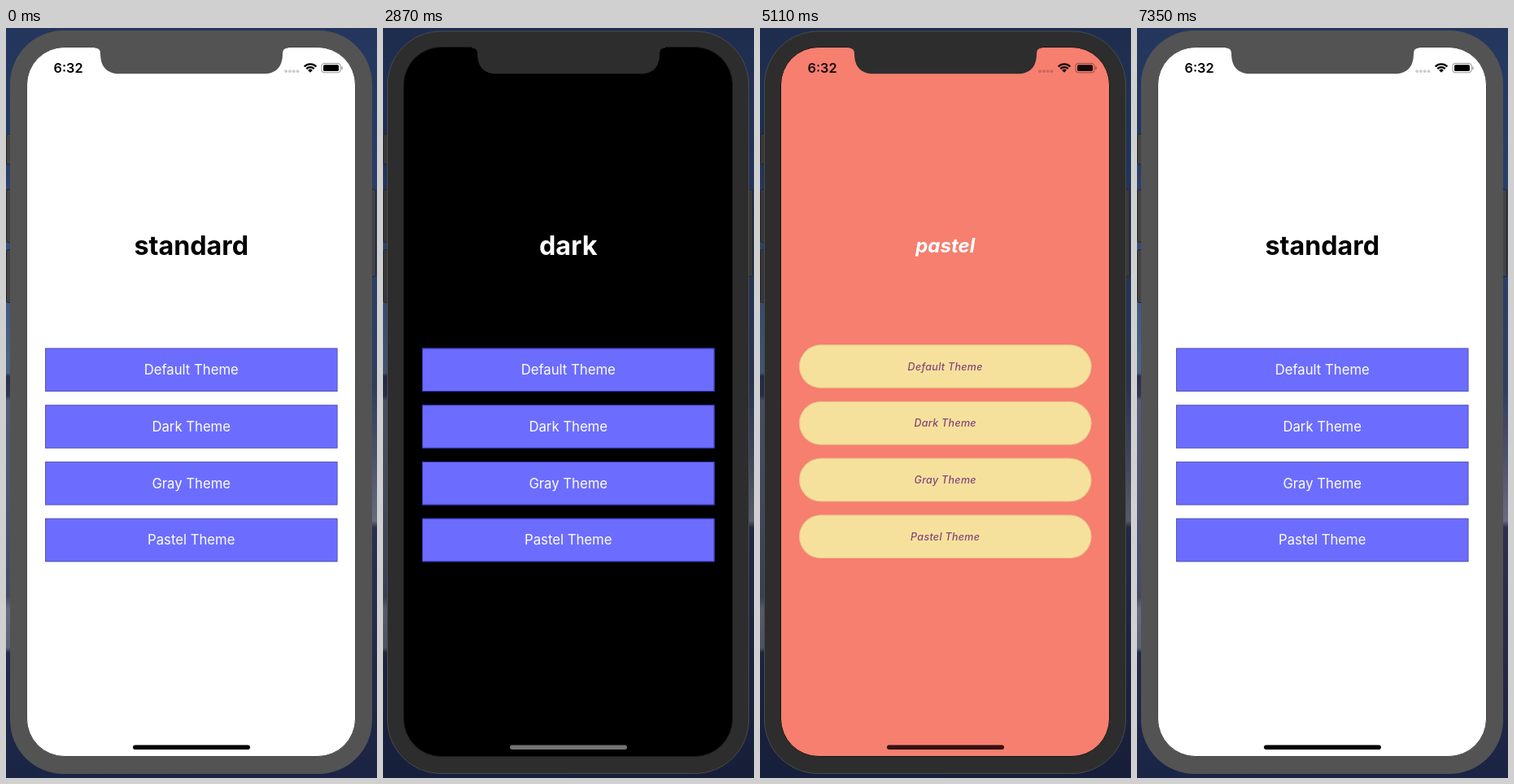
An HTML page with a canvas for the animation above (7.91 s loop, 456x922 px).

```html
<!DOCTYPE html>
<html lang="en">
<head>
<meta charset="utf-8">
<title>Theme switcher</title>
<style>
  html, body { margin: 0; width: 100%; height: 100%; overflow: hidden; background: #1d2747; }
  canvas { display: block; width: 456px; height: 922px; }
</style>
</head>
<body>
<canvas id="stage" width="456" height="922"></canvas>
<script>
const ctx = document.getElementById('stage').getContext('2d');
const LOOP = 7910, STEP = 70, CENTER = 227.7, PITCH = 69.75;
const FONT = 'Inter, Roboto, sans-serif';
const LABELS = ['Default Theme', 'Dark Theme', 'Gray Theme', 'Pastel Theme'];

const THEMES = {
  standard: {
    screen: '#ffffff', ink: '#000000', home: '#000000',
    title: { color: '#000000', font: `700 32.25px ${FONT}`, y: 278.5 },
    button: { top: 393.5, radius: 0, fill: '#6c6dff', edge: 'rgba(70,70,130,.55)' },
    label: { color: '#ffffff', font: `400 16.7px ${FONT}`, dy: 32.6 }
  },
  dark: {
    screen: '#000000', ink: null, home: '#737373',
    title: { color: '#ffffff', font: `700 32.25px ${FONT}`, y: 278.5 },
    button: { top: 393.5, radius: 0, fill: '#6c6dff', edge: 'rgba(30,30,140,.7)' },
    label: { color: '#ffffff', font: `400 16.7px ${FONT}`, dy: 32.6 }
  },
  gray: {
    screen: '#d3d3d3', ink: '#000000', home: '#000000',
    title: { color: '#333333', font: `300 18.5px ${FONT}`, y: 274 },
    button: { top: 386.3, radius: 7.5, fill: '#333333', edge: '#292929' },
    label: { color: '#dadada', font: `700 12.9px ${FONT}`, dy: 31.3, spacing: '.35px' }
  },
  pastel: {
    screen: '#f67f6f', ink: '#14090a', home: '#35110f',
    title: { color: '#ffffff', font: `italic 700 24px ${FONT}`, y: 276 },
    button: { top: 389.3, radius: 26.8, fill: '#f6e19c', edge: 'rgba(205,150,100,.35)' },
    label: { color: '#83467a', font: `italic 500 12.5px ${FONT}`, dy: 31.3, spacing: '.3px' }
  }
};

// Each tap dims a button, then switches the theme on release.
const TAPS = [
  { press: 1590, release: 1750, button: 1, theme: 'dark' },
  { press: 2990, release: 3150, button: 2, theme: 'gray' },
  { press: 4180, release: 4690, button: 3, theme: 'pastel' },
  { press: 6140, release: 6440, button: 0, theme: 'standard' }
];
const FOCUS = { start: 1330, end: 7280 };
const STATUS_COMPLETE = 3850;

function roundRect(x, y, w, h, r, fill, stroke) {
  ctx.beginPath();
  ctx.roundRect(x, y, w, h, r);
  if (fill) { ctx.fillStyle = fill; ctx.fill(); }
  if (stroke) { ctx.strokeStyle = stroke; ctx.lineWidth = 1; ctx.stroke(); }
}

function text(string, x, y, { font, color, spacing = '0px' }, align = 'center') {
  ctx.font = font;
  ctx.letterSpacing = spacing;
  ctx.textAlign = align;
  ctx.fillStyle = color;
  ctx.fillText(string, x, y);
}

function gradientStrip(x, w, stops) {
  const g = ctx.createLinearGradient(0, 0, 0, 922);
  for (const [y, color] of stops) g.addColorStop(y / 922, color);
  ctx.fillStyle = g;
  ctx.fillRect(x, 0, w, 922);
}

function drawBackdrop(focused) {
  gradientStrip(0, 228, [
    [0, '#24365c'], [130, '#233861'], [335, '#40597f'], [424, '#4b6486'], [428, '#293150'],
    [452, '#303752'], [458, '#555a75'], [560, '#50566f'], [700, '#454a64'],
    [714, '#686a80'], [762, '#5d6077'], [768, '#222b49'], [922, '#1a2546']
  ]);
  gradientStrip(228, 228, [
    [0, '#24365c'], [200, '#283f69'], [440, '#303d60'], [525, '#4c506b'],
    [606, '#686a7f'], [614, '#2b3050'], [750, '#252b49'], [922, '#1b2444']
  ]);
  if (focused) {
    ctx.fillStyle = 'rgba(0,0,0,.16)';
    ctx.fillRect(0, 0, 456, 922);
  }
}

function drawBody(focused) {
  for (const [x, y, h] of [[0.5, 130.5, 37], [0.5, 198.5, 65], [0.5, 272.5, 65], [446.5, 198.5, 107]]) {
    roundRect(x, y, 8, h, 2, focused ? '#38383a' : '#434345', '#252528');
  }
  if (focused) roundRect(5.5, 4, 444, 912.5, 66, '#2d2d2d', '#4b4b4d');
  else roundRect(5, 3, 445, 914, 66, '#535353');
}

function drawScreen(color, focused) {
  roundRect(25.5, 23.5, 404, 872, 46.5, color, focused ? '#171717' : '#484848');
  ctx.beginPath();
  ctx.moveTo(109, 23);
  ctx.lineTo(109, 24.4);
  ctx.quadraticCurveTo(116, 24.4, 116, 31);
  ctx.bezierCurveTo(116, 48, 124, 56.3, 140, 56.3);
  ctx.lineTo(316, 56.3);
  ctx.bezierCurveTo(332, 56.3, 340, 48, 340, 31);
  ctx.quadraticCurveTo(340, 24.4, 347, 24.4);
  ctx.lineTo(347, 23);
  ctx.closePath();
  ctx.fillStyle = focused ? '#2d2d2d' : '#535353';
  ctx.fill();
}

function drawWifi(ink) {
  const cx = 374, cy = 54.8, from = -Math.PI * 0.75, to = -Math.PI * 0.25;
  ctx.strokeStyle = ctx.fillStyle = ink;
  ctx.lineWidth = 2.3;
  for (const r of [10.4, 6.7]) {
    ctx.beginPath();
    ctx.arc(cx, cy, r, from, to);
    ctx.stroke();
  }
  ctx.beginPath();
  ctx.moveTo(cx, cy);
  ctx.arc(cx, cy, 4, from, to);
  ctx.fill();
}

function drawStatus(ink, complete) {
  text('6:32', 58.5, 55, { font: `600 16.3px ${FONT}`, color: ink }, 'left');
  drawWifi(ink);
  roundRect(390, 45.2, 19, 7.8, 1.6, ink);
  if (!complete) return;
  ctx.globalAlpha = 0.2;
  for (let i = 0; i < 4; i++) roundRect(342.2 + i * 4.8, 51.3, 3.8, 3.8, 1.9, ink);
  ctx.globalAlpha = 0.42;
  roundRect(388, 43.5, 23, 11.3, 3, null, ink);
  roundRect(412.2, 47.2, 1.4, 4, 0.7, ink);
  ctx.globalAlpha = 1;
}

function drawButton(theme, index, opacity) {
  const { top, radius, fill, edge } = theme.button;
  const y = top + index * PITCH;
  ctx.globalAlpha = opacity;
  roundRect(48, y, 359.5, 53.5, radius, fill);
  roundRect(48.5, y + 0.5, 358.5, 52.5, Math.max(0, radius - 0.5), null, edge);
  text(LABELS[index], CENTER, y + theme.label.dy, theme.label);
  ctx.globalAlpha = 1;
}

function pressOpacity(elapsed) {
  const p = Math.min(1, elapsed / 150);
  const eased = p < 0.5 ? 2 * p * p : 1 - 2 * (1 - p) * (1 - p);
  return 1 - 0.8 * eased;
}

function draw(t) {
  const done = TAPS.filter(tap => t >= tap.release);
  const name = done.length ? done[done.length - 1].theme : 'standard';
  const pressed = TAPS.find(tap => t >= tap.press && t < tap.release);
  const focused = t >= FOCUS.start && t < FOCUS.end;
  const theme = THEMES[name];

  drawBackdrop(focused);
  drawBody(focused);
  drawScreen(theme.screen, focused);
  if (theme.ink) drawStatus(theme.ink, name !== 'gray' || t >= STATUS_COMPLETE);
  text(name, CENTER, theme.title.y, theme.title);
  LABELS.forEach((_, i) => {
    drawButton(theme, i, pressed && pressed.button === i ? pressOpacity(t - pressed.press) : 1);
  });
  roundRect(156, 881.5, 144, 5.4, 2.7, theme.home);
}

const start = performance.now();
function tick() {
  const t = (performance.now() - start) % LOOP;
  draw(Math.floor(t / STEP) * STEP);
  requestAnimationFrame(tick);
}
tick();
</script>
</body>
</html>
```
